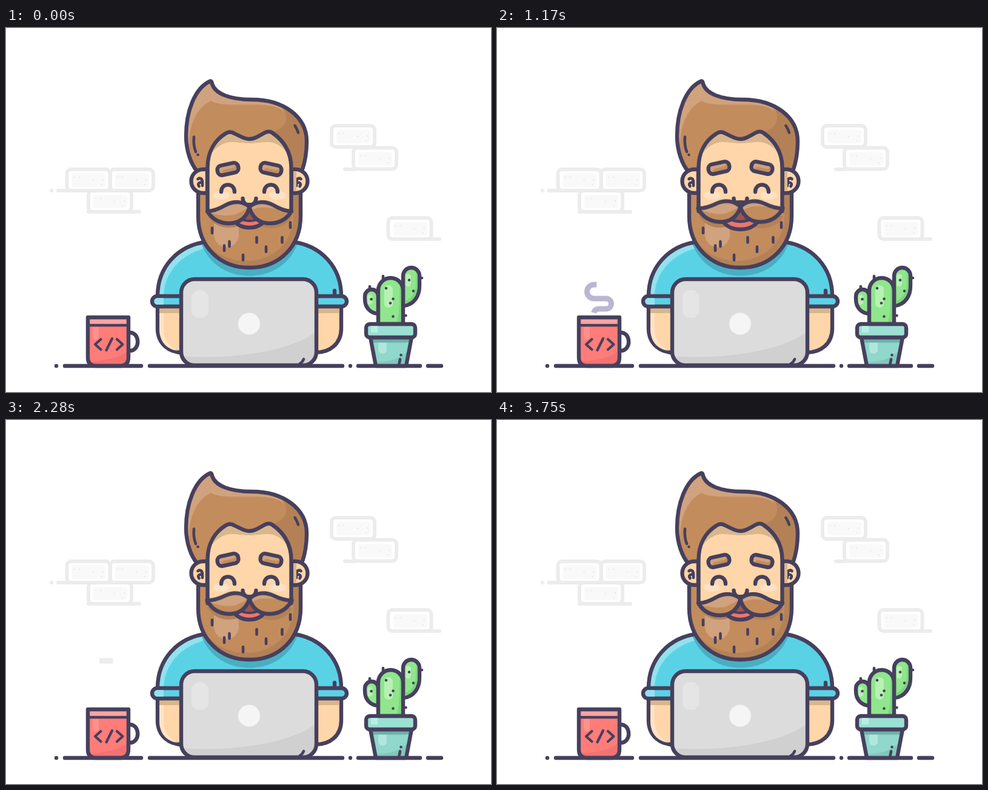
Recreate the animation shown at these times as an HTML page. Size 800 px wide and 600 px high, loop 3.78 s.

```html
<!DOCTYPE html>
<html lang="en">
<head>
<meta charset="utf-8">
<title>At the desk</title>
<style>
html, body { margin: 0; width: 100%; height: 100%; overflow: hidden; background: #fff; }
svg { display: block; width: 800px; height: 600px; }
.ink { stroke: #46405d; stroke-width: 6.4; stroke-linecap: round; stroke-linejoin: round; }
.thin { stroke-width: 4.6; }
.line { fill: none; }
.brick { fill: #fff; stroke: #ececec; stroke-width: 6; stroke-linecap: round; }
.hair { fill: #c38c5d; }
.hairlit { fill: #d0a27d; }
.hairdim { fill: #b48157; }
.skin { fill: #ffd6a9; }
.skindim { fill: #d9b68c; }
.shirt { fill: #5ad2e6; }

.nod { animation: nod 3780ms infinite; }
.brow { animation: brow 3780ms infinite; }
.tache { animation: tache 3780ms infinite; transform-origin: 401.5px 293px; }
.mouth { animation: mouth 1890ms infinite; transform-origin: 401.5px 312px; }
.steam { animation: fade 3780ms linear infinite; }
.grow { stroke-dasharray: 1 2; animation: grow 3780ms linear infinite; }
.wipe { stroke-dasharray: 1 2; animation: wipe 3780ms infinite; }
.nod, .brow, .tache, .mouth, .wipe { animation-timing-function: cubic-bezier(.37, 0, .63, 1); }

@keyframes nod {
  0%, 28.6%, 100% { transform: translateY(0); }
  14.8% { transform: translateY(3.2px); }
}
@keyframes brow {
  0%, 5%, 48%, 52%, 98%, 100% { transform: translateY(0); }
  28%, 32%, 60%, 84% { transform: translateY(-2px); }
}
@keyframes tache {
  0%, 5%, 48%, 52%, 98%, 100% { transform: rotate(0deg); }
  28%, 32%, 60%, 84% { transform: rotate(var(--lift)); }
}
@keyframes mouth {
  0%, 21%, 95%, 100% { transform: scale(1); }
  34%, 64% { transform: scale(1.17); }
}
@keyframes grow {
  0%, 7% { stroke-dashoffset: 1.02; }
  46%, 100% { stroke-dashoffset: 0; }
}
@keyframes wipe {
  0%, 26.5% { stroke-dashoffset: 0; }
  71.2%, 100% { stroke-dashoffset: -1.02; }
}
@keyframes fade {
  0%, 32.3% { opacity: 1; }
  69.6%, 100% { opacity: 0; }
}
</style>
</head>
<body>
<svg viewBox="0 0 800 600">
<defs>
  <path id="steam" pathLength="1" d="M159 474C159 467 162 463 168 463H180a8.5 8.5 0 0 0 0-17H160a11.5 11.5 0 0 1 0-23H176a13 13 0 0 0 0-26H154"/>
  <path id="mug" d="M135 477H202V543q0 14-14 14H149q-14 0-14-14Z"/>
  <path id="torso" d="M333 352C282 358 250 395 250 442H553C553 395 521 358 470 352Z"/>
  <path id="beard" d="M317 265V310C317 360 352 395 401.5 395S486 360 486 310V265Z"/>
  <path id="mop" d="M337 87.5C311 99 297 138 297 178C297 204 306 225 315 236H488C493 222 496 206 496 187C496 146 458 118 405 118C371 118 345 109 340 92Q339 87 337 87.5Z"/>
  <path id="face" d="M332.5 302V230C332.5 202 346 184 362 174Q369 169 377 174C391 181 395 183 401.5 183S412 181 426 173Q434 168 441 174C457 185 470.5 204 470.5 230V302Z"/>
  <path id="half" d="M401.5 295C392 286 377 284 362 292C350 299 341 302 332 302C340 315 352 322 368 322C386 322 398 311 401.5 295Z"/>
  <path id="trunk" d="M614 488V432.5a20.5 20.5 0 0 1 41 0V488Z"/>
  <path id="pot" d="M601 510L610 557H660L669 510Z"/>
  <rect id="lid" x="289" y="414" width="223" height="142" rx="22"/>
  <g id="ear">
    <path class="ink skin" d="M332 233H325a19.5 19.5 0 0 0 0 39H332Z"/>
    <path class="ink thin line" d="M316.5 249C319 246 324 248 324 254V260M323 255C318 254 315.5 257 318.5 261"/>
  </g>
  <g id="eye">
    <ellipse cx="355" cy="276" rx="14" ry="7" fill="#ffe1c4"/>
    <path class="ink line" d="M355 270C355 254.5 377 254.5 377 270"/>
  </g>
  <g id="brow">
    <rect class="ink hair" x="-17.5" y="-8" width="35" height="16" rx="7"/>
    <path class="hairlit" d="M-14 3V-1Q-14-4.8-10-4.8H12Q14 0 7 0H-6Q-10 0-11 4Z"/>
  </g>
  <g id="block">
    <rect class="brick" width="71" height="35" rx="7"/>
    <rect x="8" y="7" width="56" height="22" rx="4" fill="#f9f9f9"/>
    <path fill="none" stroke="#e6e6e6" stroke-width="2.2" stroke-linecap="round" d="M12 13h0M20 13h0M57 25h0M59 17h0M43 18h0"/>
  </g>
  <clipPath id="inMug"><use href="#mug"/></clipPath>
  <clipPath id="inTorso"><use href="#torso"/></clipPath>
  <clipPath id="inBeard"><use href="#beard"/></clipPath>
  <clipPath id="inMop"><use href="#mop"/></clipPath>
  <clipPath id="inFace"><use href="#face"/></clipPath>
  <clipPath id="inHalf"><use href="#half"/></clipPath>
  <clipPath id="inTrunk"><use href="#trunk"/></clipPath>
  <clipPath id="inPot"><use href="#pot"/></clipPath>
  <clipPath id="inLid"><use href="#lid"/></clipPath>
  <mask id="trail" maskUnits="userSpaceOnUse" x="130" y="380" width="80" height="110">
    <use href="#steam" class="wipe" fill="none" stroke="#fff" stroke-width="11"/>
  </mask>
</defs>

<!-- wall -->
<path class="brick" d="M75 268h0M86 268H136M136 303H220M559 233H575M700 348H715"/>
<use href="#block" x="100.5" y="233"/>
<use href="#block" x="172" y="233"/>
<use href="#block" x="136" y="268"/>
<use href="#block" x="537" y="161"/>
<use href="#block" x="573" y="197.5"/>
<use href="#block" x="630.5" y="313"/>

<!-- mug -->
<g class="steam"><g mask="url(#trail)">
  <use href="#steam" class="grow" fill="none" stroke="#bab6d2" stroke-width="9"/>
</g></g>
<path class="ink line" d="M203 502C222 501 222 533 203 532"/>
<g clip-path="url(#inMug)">
  <path fill="#ff7c79" d="M132 474h75v86h-75z"/>
  <path fill="#ff918d" d="M143 493h10v16a5 5 0 0 1-10 0z"/>
  <path fill="#f27272" d="M135 549C165 549 190 543 203 530V558H135Z"/>
  <path fill="#ffa3a2" d="M132 474h75v16h-75z"/>
</g>
<path class="ink thin line" d="M137 490H200"/>
<use href="#mug" class="ink line"/>
<path class="ink line" style="stroke-width:4.2" d="M156.5 513L147 521.5L156.5 530M175 512L165.5 531M183 513L192.5 521.5L183 530"/>

<!-- arms and shirt -->
<path class="ink skin" d="M250 458V495C250 520 268 535 292 535V458M553 458V495C553 520 535 535 510 535V458"/>
<path fill="#ffe3c4" d="M253 470H260V496C260 514 270 526 284 532C264 530 253 516 253 496Z"/>
<path class="skindim" d="M253 460H290V470H253ZM513 460H550V470H513Z"/>
<use href="#torso" class="shirt"/>
<g clip-path="url(#inTorso)">
  <path fill="#91e2ee" d="M250 442C250 395 282 356 333 352L337 361C295 369 261 398 260 442Z"/>
  <g class="nod"><use href="#beard" y="13.5" fill="#4aaec3"/></g>
</g>
<path class="ink line" d="M250 442C250 395 282 358 333 352M470 352C521 358 553 395 553 442M542 433V440"/>
<path class="ink shirt" d="M300 442H249.5a8.5 8.5 0 0 0 0 17H300M503 442H553.5a8.5 8.5 0 0 1 0 17H503"/>
<path fill="#91e2ee" d="M250 445h10v11h-10a5.5 5.5 0 0 1 0-11z"/>

<!-- head -->
<g class="nod">
  <use href="#beard" class="hair"/>
  <g clip-path="url(#inBeard)">
    <path class="hairdim" d="M474 265V310C474 354 440 383 397 384C368 384 340 371 325 345L312 400H492V265Z"/>
    <path class="hairlit" d="M343 300H384V341a20.5 20.5 0 0 1-41 0Z"/>
    <use href="#half" y="7" class="hairdim"/>
    <use href="#half" transform="matrix(-1 0 0 1 805 8)" class="hairdim"/>
  </g>
  <use href="#beard" class="ink line"/>
  <path class="ink thin line" d="M340 329.5V338M368.5 352V360M360 358.5V367M413.5 345V353.5M429 360.5V369M391 374V382.5M455.5 345V353.5M469 320.5V329"/>

  <use href="#mop" class="hair"/>
  <g clip-path="url(#inMop)">
    <path class="hairlit" d="M337 80L290 120V190H302C303 158 315 131 338 120C352 130 395 125 425 127C443 128 452 132 460 139L440 112Z"/>
    <path class="hairdim" d="M452 126C467 140 467 165 440 171C459 184 470 205 470 236H500V120Z"/>
  </g>
  <use href="#mop" class="ink line"/>
  <path class="ink thin line" d="M310 179.5C309 190 311 199 313 204M316.5 209h0M476.5 161Q480 166 482 172.5"/>

  <use href="#ear"/>
  <use href="#ear" transform="matrix(-1 0 0 1 803 0)"/>
  <path class="skindim" d="M474 236H479V269H474Z"/>

  <use href="#face" class="skin"/>
  <g clip-path="url(#inFace)">
    <path class="skindim" d="M330 222C338 203 352 190 370 188C384 188 392 190 402 190S420 188 434 188C452 190 465 203 473 222V165H330Z"/>
  </g>
  <use href="#eye"/>
  <use href="#eye" transform="matrix(-1 0 0 1 803 0)"/>
  <use href="#face" class="ink line"/>

  <g class="brow">
    <use href="#brow" transform="translate(366 232.5) rotate(-12)"/>
    <use href="#brow" transform="translate(437 232.5) rotate(12)"/>
  </g>
  <path class="ink skin" d="M390.5 281C391 295.5 412 295.5 412.5 281"/>

  <g class="mouth">
    <ellipse cx="401.5" cy="312" rx="26" ry="17" fill="#ec766f"/>
    <ellipse cx="401.5" cy="304" rx="23" ry="14" fill="#9a5550" stroke="#46405d" stroke-width="4"/>
    <ellipse class="ink line" cx="401.5" cy="312" rx="26" ry="17" vector-effect="non-scaling-stroke"/>
  </g>
  <g class="tache" style="--lift:4deg">
    <use href="#half" class="hair"/>
    <g clip-path="url(#inHalf)">
      <path class="hairlit" d="M332 280H404V296C390 298 385 309 368 309C352 310 345 306 332 304Z"/>
    </g>
    <use href="#half" class="ink line"/>
  </g>
  <g class="tache" style="--lift:-4deg">
    <g transform="matrix(-1 0 0 1 803 0)">
      <use href="#half" class="hair"/>
      <g clip-path="url(#inHalf)">
        <path class="hairlit" d="M350 280H404V306C394 294 376 293 350 300Z"/>
      </g>
      <use href="#half" class="ink line"/>
    </g>
  </g>
</g>

<!-- desk and laptop -->
<path class="ink line" d="M83 557h0M97 557H223M237 557H555M568 557h0M581 557H683M696 557H718"/>
<use href="#lid" fill="#dcdcdc"/>
<g clip-path="url(#inLid)">
  <path fill="#d0d0d0" d="M289 541C380 547 472 532 514 499V560H289Z"/>
</g>
<rect x="306" y="432" width="28" height="46" rx="13" fill="#e5e5e5"/>
<use href="#lid" class="ink line"/>
<path class="ink thin line" d="M491 546Q489 551 484 554"/>
<circle cx="401" cy="487.5" r="18" fill="#f5f5f5"/>

<!-- cactus -->
<g fill="#8fe68c">
  <path class="ink" d="M655 458C674 456 682 441 682 425V408.5a13.5 13.5 0 0 0-27 0Z"/>
  <path class="ink" d="M614 471C600 470 592 460 592 447V442a11 11 0 0 1 22 0Z"/>
  <use href="#trunk"/>
</g>
<path fill="#7dd57e" d="M658 455V450C669 446 675 436 676 424V404L679 409V425C678 440 671 451 658 455Z"/>
<path fill="#b7f1b3" d="M659 408a5 5 0 0 1 9 0V422a4.5 4.5 0 0 1-9 0ZM596 442a4.5 4.5 0 0 1 8 0V452a4 4 0 0 1-8 0Z"/>
<g clip-path="url(#inTrunk)">
  <path fill="#7dd57e" d="M649 416H656V488H644C649 472 650 450 649 416Z"/>
  <rect x="624" y="424" width="14" height="37" rx="7" fill="#b7f1b3"/>
</g>
<use href="#trunk" class="ink line"/>
<path class="ink thin line" d="M622 409V414M600 426V431M627 429h0M638.5 446.5h0M634 453.5h0M638.5 475.5h0M665 415.5h0M672 433.5h0M602.5 447h0M659.5 474h0M686 412h0"/>
<g clip-path="url(#inPot)">
  <path fill="#8fd8cb" d="M598 508h74v52h-74z"/>
  <path fill="#82c8bd" d="M606 551C635 551 654 543 668 527V558H606Z"/>
  <path fill="#b0e6dd" d="M614 512H628V530a7 7 0 0 1-14 0Z"/>
  <path fill="#6db0a9" d="M598 508h74v10.5h-74z"/>
</g>
<use href="#pot" class="ink line"/>
<rect class="ink" x="594" y="488" width="81" height="22" rx="6" fill="#9be0d3"/>
<path fill="#b9eee4" d="M602 491.2H613V502H602Z"/>
<path class="ink thin line" d="M650 546L648.5 554M651.5 539h0"/>
</svg>
</body>
</html>
```
